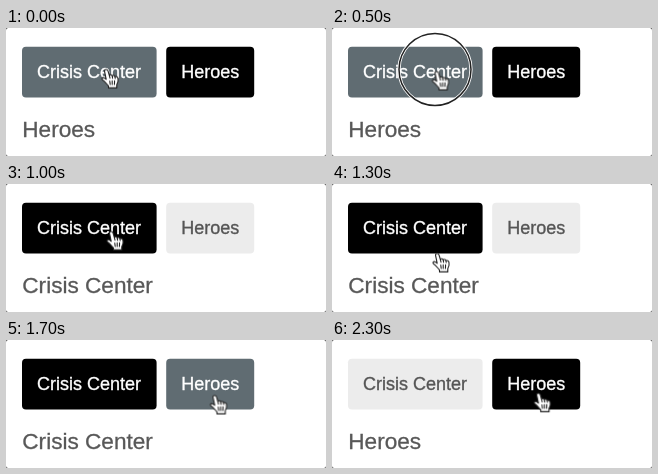
Write an HTML page that moves like this. It is 320 px wide and 128 px high and loops after 2.6 s.

```html
<!DOCTYPE html>
<html lang="en">
<head>
<meta charset="utf-8">
<title>Router tabs</title>
<style>
  html, body { margin: 0; width: 100%; height: 100%; overflow: hidden; background: #555; }
  svg { display: block; width: 320px; height: 128px; font-family: "Liberation Sans", Arial, sans-serif; }
  .tab { font-size: 18px; }
  .tab text { fill: var(--ink); stroke: var(--ink); stroke-width: .35px; }
  .tab rect { fill: var(--face); }
  .title { font-size: 22.6px; fill: #585858; stroke: #585858; stroke-width: .3px; }
  svg * { animation: 2600ms step-end infinite; }

  .crisis { animation-name: crisis; }
  .heroes { animation-name: heroes; }
  .title-crisis { animation-name: title-crisis; }
  .title-heroes { animation-name: title-heroes; }
  .ring-one { animation-name: ring-one; }
  .ring-two { animation-name: ring-two; }
  .hand { animation-name: move; }

  /* hover, active, plain */
  @keyframes crisis {
    0% { --face: #606c72; --ink: #fff; }
    23.07% { --face: #000; --ink: #fff; }
    88.46%, 100% { --face: #ececec; --ink: #555; }
  }
  @keyframes heroes {
    0% { --face: #000; --ink: #fff; }
    23.07% { --face: #ececec; --ink: #555; }
    61.53% { --face: #606c72; --ink: #fff; }
    88.46%, 100% { --face: #000; --ink: #fff; }
  }
  @keyframes title-crisis {
    0% { opacity: 0; }
    23.07% { opacity: 1; }
    88.46%, 100% { opacity: 0; }
  }
  @keyframes title-heroes {
    0% { opacity: 1; }
    23.07% { opacity: 0; }
    88.46%, 100% { opacity: 1; }
  }
  @keyframes ring-one {
    0% { opacity: 0; }
    19.23% { opacity: 1; }
    23.07%, 100% { opacity: 0; }
  }
  @keyframes ring-two {
    0% { opacity: 0; }
    80.76% { opacity: 1; }
    88.46%, 100% { opacity: 0; }
  }
  @keyframes move {
    0% { transform: translate(95px, 40.5px); }
    3.84% { transform: translate(99px, 42px); }
    15.38% { transform: translate(99.5px, 42.5px); }
    23.07% { transform: translate(100px, 43px); }
    38.46% { transform: translate(100px, 46.5px); }
    42.3% { transform: translate(100px, 54.5px); }
    46.15% { transform: translate(100px, 63.5px); }
    49.99% { transform: translate(100px, 68.5px); }
    53.84% { transform: translate(144px, 76.5px); }
    57.69% { transform: translate(196px, 74.5px); }
    61.53% { transform: translate(205px, 63.5px); }
    65.38% { transform: translate(203.5px, 54.5px); }
    69.23% { transform: translate(202.5px, 53.5px); }
    73.07% { transform: translate(202px, 53px); }
    76.92%, 100% { transform: translate(201.2px, 52.3px); }
  }
</style>
</head>
<body>
<svg viewBox="0 0 320 128">
  <rect width="320" height="128" rx="2.5" fill="#fff"/>

  <g class="tab crisis">
    <rect x="16" y="18.7" width="134.6" height="50.8" rx="4"/>
    <text x="31" y="49.8">Crisis Center</text>
  </g>
  <g class="tab heroes">
    <rect x="160.2" y="18.7" width="88" height="50.8" rx="4"/>
    <text x="175.2" y="49.8">Heroes</text>
  </g>

  <text class="title title-crisis" x="16.3" y="108.9">Crisis Center</text>
  <text class="title title-heroes" x="16.3" y="108.9">Heroes</text>

  <g fill="none">
    <g class="ring-one">
      <circle cx="103" cy="41.4" r="36" stroke="#fff" stroke-width="3.2"/>
      <circle cx="103" cy="41.4" r="36" stroke="#222" stroke-width="1.5"/>
    </g>
    <g class="ring-two">
      <circle cx="204.3" cy="50.5" r="36" stroke="#fff" stroke-width="3.2"/>
      <circle cx="204.3" cy="50.5" r="36" stroke="#222" stroke-width="1.5"/>
    </g>
  </g>

  <g class="hand" stroke="#222" stroke-width="1.1" stroke-linejoin="round" stroke-linecap="round">
    <path fill="#fff" d="M3.5 2.6C3.5.6 6.5.6 7 2.4L8.4 7C9 5.9 10.8 6.1 11.2 7.4C12 6.6 13.6 7 14 8.2C15 7.8 16.7 8.4 17 9.8C17.5 12.5 16.8 14.5 15.8 16V19.4H7.5V17.5C5.5 15.5 4.2 12.9 1.4 11.2C.2 10 1.6 8.6 3.2 9.4L5.2 10.8Z"/>
    <path fill="none" d="M8.4 7L9 9.6M11.2 7.4L11.6 9.8M14 8.2L14.2 10M8.8 12.6L9.2 16M11.2 12.4V16M13.6 12.4L13.4 16"/>
  </g>
</svg>
</body>
</html>
```
